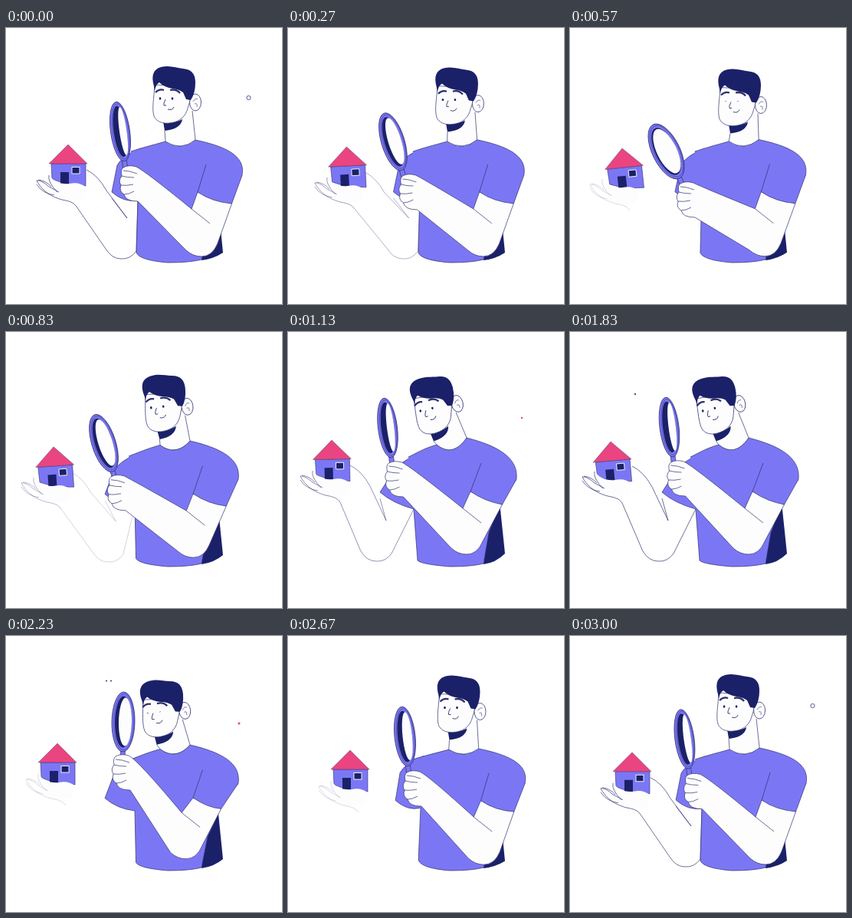
These frames come from a looping animation (360x360 px, 3030 ms). An HTML page:

```html
<!DOCTYPE html>
<html lang="en">
<head>
<meta charset="utf-8">
<title>House inspection</title>
<style>
html, body { margin: 0; width: 100%; height: 100%; overflow: hidden; background: #fff; }
svg { display: block; width: 100vw; height: 100vh; }
</style>
</head>
<body>
<svg id="stage" viewBox="0 0 360 360"></svg>
<script>
const LOOP = 3030;
const TIMES = [0, 570, 1130, 1830, 2230, 2670];
const PURPLE = '#7b77f4', NAVY = '#1b2168', PINK = '#ea4580', SKIN = '#fdfdfd', INK = '#30306f';

// Poses at TIMES
const keys = {
  headX: [222, 224, 197, 197.5, 208.5, 225.5],
  headY: [100, 103.5, 102, 102, 102.5, 101.5],
  headTurn: [0, 0, -13, -13, -5, 0],
  nod: [0, 0, 1, 1, 1, 0],
  lean: [0, .06, 1, 1, .5, -.12],
  elbow: [0, .04, 1, 1, .92, -.02],
  leftArm: [0, .05, 1, 1, .65, 0],
  gripX: [150, 141, 128.5, 128.5, 140, 152],
  gripY: [182, 203, 171, 170, 157, 178],
  glassX: [149, 125.5, 130, 129.5, 153, 152.5],
  glassY: [135, 161, 125, 124, 112, 131],
  glassWidth: [12.5, 18, 12.5, 12.5, 15, 13.5],
  glassTurn: [-8, -26, -7, -7, 1, -6],
  houseX: [81, 68, 57, 53, 67, 81],
  houseY: [152, 157, 141, 143, 140, 149],
  houseTurn: [0, -6, -1, -5, 0, 0],
  palmX: [81, 67, 57, 57, 67, 81],
  palmY: [152, 157, 141, 142, 140, 149],
  armLine: [1, 0, .75, 1, 0, 0]
};

// Periodic cubic through the keys, without overshoot
function sample(values, t) {
  const n = TIMES.length;
  const time = i => TIMES[((i % n) + n) % n] + Math.floor(i / n) * LOOP;
  const value = i => values[((i % n) + n) % n];
  const rate = i => (value(i + 1) - value(i)) / (time(i + 1) - time(i));
  const tangent = i => {
    const a = rate(i - 1), b = rate(i);
    return a * b <= 0 ? 0 : 2 * a * b / (a + b);
  };
  let i = n - 1;
  while (TIMES[i] > t) i--;
  const span = time(i + 1) - time(i), u = (t - time(i)) / span;
  const ease = u * u * (3 - 2 * u);
  return value(i) + (value(i + 1) - value(i)) * ease
    + span * u * (1 - u) * (tangent(i) * (1 - u) - tangent(i + 1) * u);
}

const shift = (k, x, y, dx, dy) => [x + k * dx, y + k * dy];
const off = ([x, y], dx, dy) => [x + dx, y + dy];
// Path template: points become "x y"
const d = (parts, ...pts) => parts.reduce((s, part, i) =>
  s + part + (i < pts.length ? pts[i].map(v => v.toFixed(2)).join(' ') : ''), '');
const path = (data, fill = 'none', width = .7, extra = '') =>
  `<path d="${data}" fill="${fill}" stroke="${INK}" stroke-width="${width}" ${extra}/>`;
const line = (data, width = .7, extra = '') => path(data, 'none', width, extra);
const solid = (data, fill) => `<path d="${data}" fill="${fill}"/>`;
const oval = (x, y, rx, ry, fill, extra = '') =>
  `<ellipse cx="${x}" cy="${y}" rx="${rx}" ry="${ry}" fill="${fill}" ${extra}/>`;
const group = (x, y, turn, body) =>
  `<g transform="translate(${x} ${y}) rotate(${turn})">${body}</g>`;
const outline = `stroke="${INK}" stroke-width=".8"`;

// Points shared by neighbouring body parts
const collar = k => [shift(k, 208, 148, -14, -1), shift(k, 228, 161, -13, 3), shift(k, 247, 146, -14, -8)];
const leftCuff = k => [shift(k, 138, 214, -18, -5), shift(k, 172, 225, -8, 6)];
const rightShoulder = k => shift(k, 309, 184, -10, 0);

function leftArm(p) {
  const k = p.leftArm, elbow = shift(k, 150, 301, -35, -2);
  const palm = [p.palmX, p.palmY];
  const [tip, cuff] = leftCuff(p.lean);
  const crease = off(elbow, 8 + 5 * k, -53);
  const fade = `opacity="${p.armLine.toFixed(3)}"`;
  return line(d`M${off(palm, 11, 81)}L${off(elbow, -20, -13)}Q${off(elbow, -12, 0)} ${elbow}Q${off(elbow, 12, 1)} ${off(elbow, 20, -10)}L${cuff}`, .7, fade)
    + line(d`M${off(palm, 24, 33)}Q${off(palm, 39, 40)} ${off(palm, 50, 60)}L${crease}L${off(tip, 0, 8)}`, .7, fade);
}

function torso(p) {
  const k = p.lean;
  const [collarL, collarDip, collarR] = collar(k);
  const [tip, cuff] = leftCuff(k);
  const sleeveTop = shift(k, 150, 167, -9, 5);
  const shoulder = rightShoulder(k);
  const dark = solid(d`M${[255, 303]}L${[264, 240]}L${[276, 222]}L${shift(k, 283, 293, 0, -4)}Q${[271, 301]} ${[255, 303]}Z`, NAVY);
  const sleeve = path(d`M${shift(k, 176, 157, -10, 4)}Q${off(sleeveTop, 2, -1)} ${off(sleeveTop, -5, 12)}L${tip}Q${off(tip, 16, 14)} ${cuff}`, PURPLE);
  const body = path(d`M${cuff}L${shift(k, 170, 293, -1, 5)}Q${[174, 303]} ${[211, 306]}Q${[240, 306]} ${[255, 302]}L${shift(k, 264, 262, -2, 0)}L${shift(k, 286, 220, -8, 0)}L${off(shoulder, -1, 8)}C${shift(k, 313, 166, -12, -3)} ${shift(k, 285, 154, -13, -6)} ${collarR}Q${collarDip} ${collarL}C${off(collarL, -18, 5)} ${shift(k, 178, 156, -12, 3)} ${shift(k, 163, 161, -6, 2)}`, PURPLE);
  return dark + sleeve + body;
}

function neck(p) {
  const a = p.headTurn * Math.PI / 180;
  const fromHead = (x, y) => [
    p.headX + x * Math.cos(a) - y * Math.sin(a),
    p.headY + x * Math.sin(a) + y * Math.cos(a)];
  const [left, dip, right] = collar(p.lean);
  const drop = 4 * p.nod;
  const chin = off(fromHead(-16, 22), 0, drop), jaw = off(fromHead(-15, 34), 0, drop);
  const nape = fromHead(21, 8);
  return solid(d`M${chin}L${jaw}L${left}Q${dip} ${right}L${nape}Z`, SKIN)
    + line(d`M${jaw}L${left}Q${dip} ${right}L${nape}`);
}

function head(p, t) {
  const closing = at => Math.max(0, 1 - Math.max(0, Math.abs(t - at) - 40) / 80);
  const open = 1 - .8 * Math.max(closing(570), closing(2230));
  const eye = (x, y) => oval(x, y, 1.3, 1.7 * open, NAVY);
  const ear = oval(25, -3, 7.5, 11, SKIN, outline)
    + line('M22-4Q25-9 28-7M24-1Q28-3 27 3', .6);
  const face = solid('M-17 22Q-3 25 8 19Q6 32-15 34Z', NAVY)
    + path('M-28-26C-29-8-32 5-29 15C-26 22-18 25-9 24C2 23 10 18 14 8L19-8L8-24Z', SKIN);
  const hair = solid('M-29-24C-33-38-30-46-20-49C-8-52 0-48 9-47C21-46 25-39 25-29Q25-15 19-6L13-7L9-16Q4-20-5-21Q-16-23-22-29Q-27-26-28-18Z', NAVY);
  const features = line('M-27-16Q-22-21-16-19M-8-19Q0-21 5-15', 2.3)
    + eye(-21, -8) + eye(-5, -8)
    + line('M-14-7Q-17-1-16 1L-13 1M-11 6Q-5 8-3 3', .9);
  return group(p.headX, p.headY + 4 * p.nod, p.headTurn, face)
    + group(p.headX, p.headY, p.headTurn, ear)
    + group(p.headX, p.headY + 4 * p.nod, p.headTurn, hair)
    + group(p.headX - 2 * p.nod, p.headY + 4 * p.nod, p.headTurn, features);
}

function house(p) {
  return group(p.houseX, p.houseY, p.houseTurn,
    path('M-22 25H23V54L-2 52L-21 45Z', PURPLE, .6)
    + solid('M-10 36H1V52H-10Z', NAVY)
    + `<rect x="5" y="29.5" width="10" height="8.5" fill="${NAVY}" stroke="#fff" stroke-width=".9"/>`
    + path('M0 0L25 25H-25Z', PINK, .4));
}

function palm(p) {
  const fade = `opacity="${(.25 + .75 * p.armLine).toFixed(3)}"`;
  return group(p.palmX, p.palmY, 0,
    solid('M-26 37C-20 49-10 52 2 51Q14 48 24 56L18 72L-5 73Q-25 66-26 37Z', SKIN)
    + line('M11 81C5 72-5 74-14 70C-26 66-36 57-41 47Q-35 46-25 55L-12 62M-41 52Q-33 64-18 66M-39 46Q-29 47-22 55M-25 40Q-27 49-14 62', .7, fade));
}

function glass(p) {
  const w = p.glassWidth;
  const depth = (20 - w) / 2; // the rim looks deeper when seen from the side
  return group(p.glassX, p.glassY, p.glassTurn,
    path('M-3 36H3V60H-3Z', PURPLE)
    + oval(0, 0, w, 39, PURPLE, outline)
    + oval(.7, 0, w - 2, 36.5, 'none', `stroke="${INK}" stroke-width=".5"`)
    + oval(0, 0, w - 4, 33.5, NAVY)
    + oval(depth, 0, w - 4 - depth, 31.5, SKIN));
}

function rightArm(p) {
  const k = p.elbow, grip = [p.gripX, p.gripY];
  const elbow = shift(k, 255, 298, -22, -8);
  const inner = shift(k, 242, 236, -14, -6);
  const cuffIn = shift(p.lean, 250, 214, -12, -6);
  const cuffOut = shift(k, 294.5, 229, -15, -4);
  const shoulder = rightShoulder(p.lean);
  const armpit = shift(p.lean, 261, 178, -9, -7);
  const g = (x, y) => off(grip, x, y);
  const arm = path(d`M${g(20, -1)}Q${g(32, 5)} ${inner}L${cuffIn}L${cuffOut}L${off(elbow, 21, -17)}Q${off(elbow, 14, 0)} ${elbow}Q${off(elbow, -11, 0)} ${off(elbow, -20, -8)}L${g(22, 44)}Q${g(6, 44)} ${g(4, 35)}Q${g(-3, 31)} ${g(0, 23)}Q${g(-4, 17)} ${g(1, 11)}Q${g(-1, 3)} ${g(3, 0)}Q${g(10, -4)} ${g(20, -1)}Z`, SKIN);
  const fingers = line(d`M${g(3, 4)}Q${g(11, 4)} ${g(21, 8)}M${g(1, 11)}Q${g(8, 13)} ${g(17, 13)}M${g(0, 23)}Q${g(7, 24)} ${g(16, 22)}M${g(4, 35)}Q${g(10, 35)} ${g(17, 31)}`);
  const crease = line(d`M${inner}L${off(inner, 24, 19)}`);
  const edge = d`M${armpit}L${cuffIn}Q${off(cuffIn, 19, 13)} ${cuffOut}L${off(shoulder, -1, 8)}`;
  const sleeve = solid(edge + d`L${off(shoulder, -8, -6)}Z`, PURPLE) + line(edge);
  return arm + fingers + crease + sleeve;
}

function sparks(t) {
  const near = (at, reach) => {
    const gap = Math.abs(t - at);
    return Math.max(0, 1 - Math.min(gap, LOOP - gap) / reach);
  };
  const dot = (x, y, r, color, amount) => oval(x, y, r * amount, r * amount, color);
  return oval(316.5, 91, 2.6, 2.6, 'none',
      `stroke="${INK}" stroke-width=".8" opacity="${Math.min(1, 2 * near(0, 220))}"`)
    + dot(305, 112, 1.2, PINK, near(1130, 200))
    + dot(304, 114, 1.6, PINK, near(2230, 200))
    + dot(85, 81, 1.1, NAVY, near(1830, 200))
    + dot(131, 58.5, .9, NAVY, near(2230, 200))
    + dot(137, 58.5, .9, NAVY, near(2230, 200));
}

const stage = document.getElementById('stage');

function draw(t) {
  const p = {};
  for (const name in keys) p[name] = sample(keys[name], t);
  stage.innerHTML = leftArm(p) + torso(p) + neck(p) + head(p, t)
    + house(p) + palm(p) + glass(p) + rightArm(p) + sparks(t);
}

const start = performance.now();
function tick() {
  draw((performance.now() - start) % LOOP);
  requestAnimationFrame(tick);
}
tick();
</script>
</body>
</html>
```
